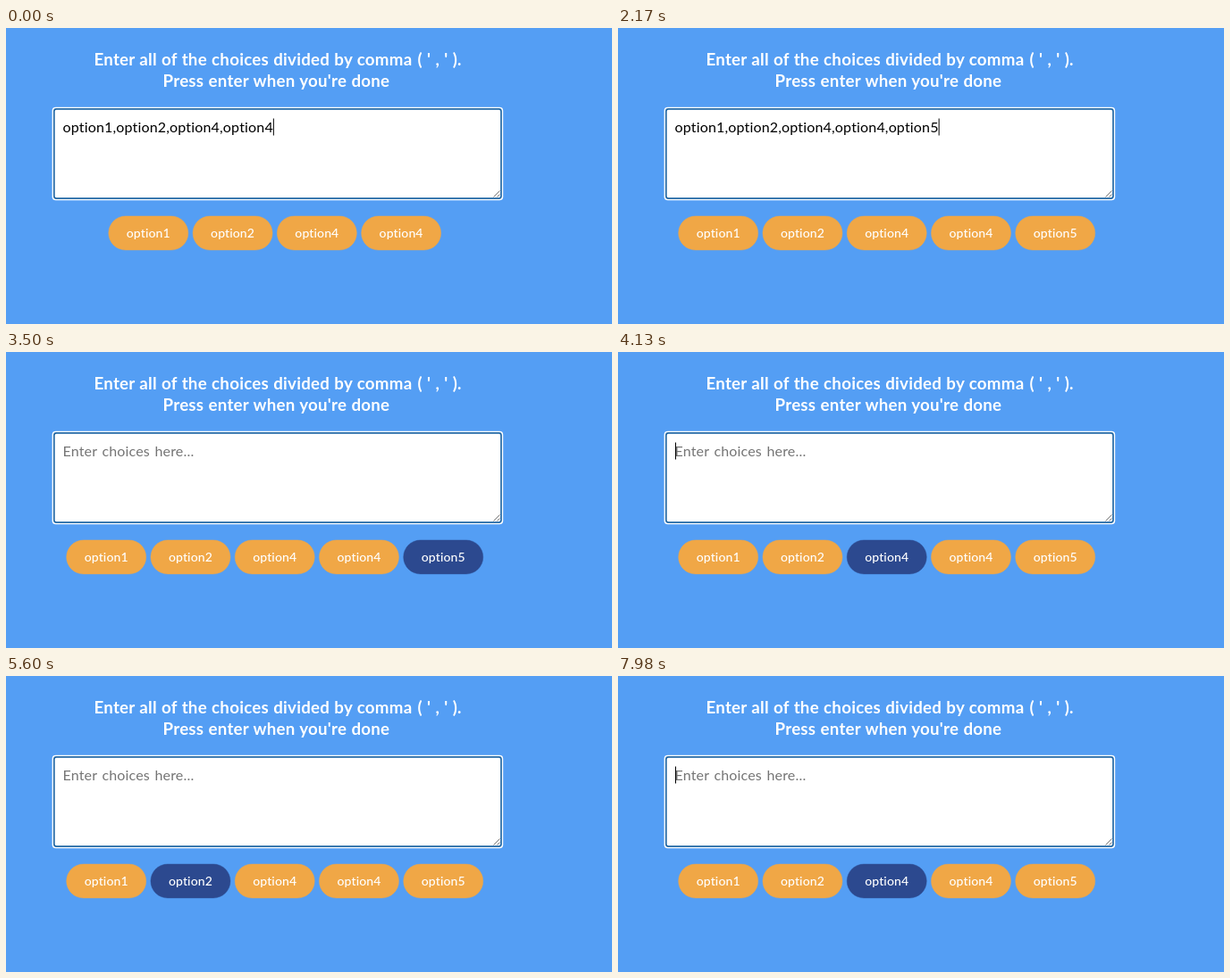
Animation of 678 by 332 pixels, one loop 8.05 s. Source, as an HTML page:

```html
<!DOCTYPE html>
<html lang="en">
<head>
<meta charset="utf-8">
<title>Random choice picker</title>
<style>
  html, body { margin: 0; width: 100%; height: 100%; overflow: hidden; background: #549ef4; }
  svg { display: block; width: 678px; height: 332px; font-family: Lato, "Open Sans", sans-serif; }
  .head { font-size: 18.72px; font-weight: 700; fill: #fff; letter-spacing: .25px; word-spacing: .4px; }
  .input { font-size: 16px; letter-spacing: .17px; word-spacing: 1.3px; white-space: pre; }
  .chip { font-size: 14px; font-weight: 500; letter-spacing: .13px; fill: #fff; text-anchor: middle; }
  #chips rect { stroke-opacity: .45; }
</style>
</head>
<body>
<svg viewBox="0 0 678 332">
  <rect width="678" height="332" fill="#549ef4"/>
  <g class="head">
    <text x="98.5" y="42">Enter all of the choices divided by comma</text>
    <text x="460.5" y="42">( ' , ' ).</text>
    <text x="175.5" y="66">Press enter when you're done</text>
  </g>
  <rect x="51.6" y="88.7" width="504.6" height="104.6" rx="4" fill="#fff"/>
  <rect x="53.8" y="90.9" width="500.2" height="100.2" rx="2.5" fill="#fff" stroke="#2268a5" stroke-width="1.7"/>
  <path d="M545.5 189.5l7-7M549.5 189.5l3-3" stroke="#777" stroke-width="1"/>
  <text id="field" class="input" x="63.5" y="117"></text>
  <rect id="caret" y="101.5" width="1" height="19" fill="#000"/>
  <g id="chips"></g>
</svg>
<script>
const LOOP = 8050, TICK = 70;
const START = 'option1,option2,option4,option4', ADDED = ',option5';
const KEYS = [630, 840, 980, 1120, 1260, 1400, 1540, 1890]; // key press times
const CLEAR = 2780, BLINK = 500;
const PICK = 2860, STEP = 101;
const PICKS = '413024' + '421304231402' + '032140312' + '1302'; // ends on the winner
const MID = 300.7, PAD = 20, GAP = 5.2;

const $ = id => document.getElementById(id);
const field = $('field'), caret = $('caret');

function add(tag, attrs, parent) {
  const el = document.createElementNS('http://www.w3.org/2000/svg', tag);
  for (const k in attrs) el.setAttribute(k, attrs[k]);
  return parent.appendChild(el);
}

const chips = Array.from({ length: 5 }, () => {
  const g = add('g', {}, $('chips'));
  return {
    g,
    box: add('rect', { y: 211, height: 38, rx: 19 }, g),
    label: add('text', { class: 'chip', y: 235 }, g)
  };
});

function picked(t) {
  if (t < PICK) return -1;
  const n = Math.min(PICKS.length - 1, Math.floor((t - PICK) / STEP));
  return +PICKS[n];
}

function drawChips(names, hot) {
  chips.forEach((c, i) => {
    c.g.style.display = i < names.length ? '' : 'none';
    c.label.textContent = names[i] || '';
  });
  const widths = names.map((_, i) => chips[i].label.getComputedTextLength() + 2 * PAD);
  const total = widths.reduce((a, b) => a + b, 0) + GAP * (names.length - 1);
  let x = MID - total / 2;
  widths.forEach((w, i) => {
    const { box, label } = chips[i];
    const color = i === hot ? '#2c498f' : '#f0a746';
    box.setAttribute('x', x);
    box.setAttribute('width', w);
    box.setAttribute('fill', color);
    box.setAttribute('stroke', color);
    label.setAttribute('x', x + w / 2);
    x += w + GAP;
  });
}

function draw(t) {
  const typed = START + ADDED.slice(0, KEYS.filter(k => k <= t).length);
  const empty = t >= CLEAR;
  field.textContent = empty ? 'Enter choices here...' : typed;
  field.setAttribute('fill', empty ? '#757575' : '#000');

  const last = KEYS[KEYS.length - 1];
  const since = empty ? t - CLEAR : Math.max(0, t - last);
  caret.style.display = Math.floor(since / BLINK) % 2 ? 'none' : '';
  caret.setAttribute('x', empty ? 64 : 63.5 + field.getComputedTextLength());

  drawChips(typed.split(',').filter(Boolean), picked(t));
}

let shown = -1;
function frame(now) {
  const t = Math.floor((now % LOOP) / TICK) * TICK;
  if (t !== shown) draw(shown = t);
  requestAnimationFrame(frame);
}
draw(0);
requestAnimationFrame(frame);
</script>
</body>
</html>
```
